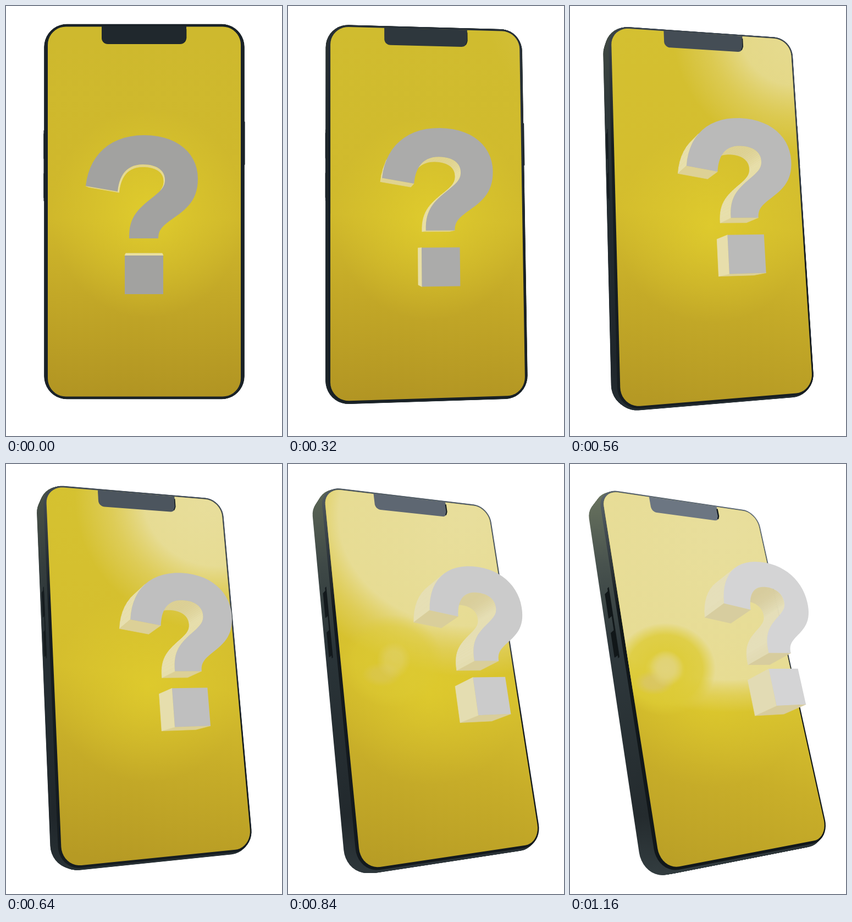
Animation, 502 px wide and 779 px high, one loop 1200 ms. Source, as an HTML page with a canvas:

```html
<!DOCTYPE html>
<html lang="en">
<head>
<meta charset="utf-8">
<title>Turning phone</title>
<style>
  html, body { margin: 0; width: 100%; height: 100%; overflow: hidden; background: #fff; }
  canvas { display: block; }
</style>
</head>
<body>
<canvas id="stage" width="502" height="779"></canvas>
<script>
const ctx = document.getElementById('stage').getContext('2d');
const LOOP = 1200, STEP = 40, END = 1160;
const CX = 251.5, CY = 372.5;             // centre of the phone
const FOCAL = 1250, PIVOT = 25;           // pivot lies inside the body
const DEPTH = 48;                         // body thickness
const MARK_NEAR = 183, MARK_FAR = 125;    // heights of the mark above the glass
const YAW = .58, PITCH = .317, ROLL = .009;

const ease = k => k * k * (3 - 2 * k);
const clamp = k => Math.min(1, Math.max(0, k));
const mix = (a, b, k) => a.map((v, i) => v + (b[i] - v) * k);
const rgb = (c, a = 1) => `rgba(${c.map(Math.round).join()},${a})`;

// x, y on the unturned glass, z above it, to stage coordinates
function camera(p) {
  const ca = Math.cos(YAW * p), sa = Math.sin(YAW * p);
  const cb = Math.cos(PITCH * p), sb = Math.sin(PITCH * p);
  const cr = Math.cos(ROLL * p), sr = Math.sin(ROLL * p);
  return ([x, y], z = 0) => {
    const X = x - CX, Y = y - CY, Z = -PIVOT - z;
    const py = Y * cb + Z * sb, pz = Z * cb - Y * sb;
    const px = X * ca - pz * sa;
    const s = FOCAL / (FOCAL + PIVOT + X * sa + pz * ca);
    return [CX + s * (px * cr + py * sr), CY + s * (py * cr - px * sr)];
  };
}

function trace(points) {
  ctx.beginPath();
  points.forEach(q => ctx.lineTo(...q));
  ctx.closePath();
}

function fill(points, style, line = 0) {
  trace(points);
  ctx.fillStyle = ctx.strokeStyle = style;
  ctx.fill();
  if (line) {
    ctx.lineWidth = line;
    ctx.lineJoin = 'round';
    ctx.stroke();
  }
}

function linear(x0, y0, x1, y1, stops) {
  const g = ctx.createLinearGradient(x0, y0, x1, y1);
  stops.forEach(([k, c]) => g.addColorStop(k, rgb(c)));
  return g;
}

function glow(x, y, rx, ry, stops) {
  const g = ctx.createRadialGradient(0, 0, 0, 0, 0, 1);
  stops.forEach(([k, c, a]) => g.addColorStop(k, rgb(c, a)));
  ctx.save();
  ctx.translate(x, y);
  ctx.scale(rx, ry);
  ctx.fillStyle = g;
  ctx.fillRect(-1, -1, 2, 2);
  ctx.restore();
}

function roundBox(l, t, r, b, rTop, rBottom) {
  const pts = [];
  [[l, t, 1, 1, rTop], [r, t, -1, 1, rTop], [r, b, -1, -1, rBottom], [l, b, 1, -1, rBottom]]
    .forEach(([x, y, dx, dy, rad], n) => {
      for (let i = 0; i <= 10; i++) {
        const a = Math.PI * (1 + n / 2 + i / 20);
        pts.push([x + rad * (dx + Math.cos(a)), y + rad * (dy + Math.sin(a))]);
      }
    });
  return pts;
}

const panel = m => roundBox(76 - m, 37.5 - m, 427 + m, 707.5 + m, 33 + m, 33 + m);

function curve(start, parts) {
  const pts = [start];
  for (const s of parts) {
    const a = pts[pts.length - 1];
    if (s.length === 2) { pts.push(s); continue; }
    for (let i = 1; i <= 14; i++) {
      const k = i / 14, m = 1 - k;
      pts.push([0, 1].map(c =>
        m * m * m * a[c] + 3 * m * m * k * s[c] + 3 * m * k * k * s[c + 2] + k * k * k * s[c + 4]));
    }
  }
  return pts;
}

const hook = curve([145, 326], [
  [151, 270, 190, 234, 251, 234],
  [313, 234, 349, 268, 349, 313],
  [349, 350, 330, 367, 305, 384],
  [285, 398, 277, 405, 277, 421],
  [224, 421],
  [223, 385, 238, 370, 260, 352],
  [282, 335, 289, 328, 289, 315],
  [289, 297, 273, 287, 249, 287],
  [220, 287, 206, 306, 203, 336]
]);
const dot = [[216, 452], [286, 452], [286, 522], [216, 522]];

// mark outlines are given as seen at rest, so undo their enlargement
const shrink = (FOCAL - MARK_NEAR) / FOCAL;
const mark = [hook, dot].map(s => s.map(([x, y]) => [CX + (x - CX) * shrink, CY + (y - CY) * shrink]));

function drawBody(at, p) {
  const dark = [26, 34, 40];
  const toned = stops => stops.map(([k, c]) => [k, mix(dark, c, p)]);
  const side = linear(0, 60, 0, 740, toned([
    [0, [104, 114, 94]], [.18, [72, 82, 78]], [.4, [46, 56, 60]], [.85, [36, 43, 46]], [1, [50, 60, 63]]
  ]));
  const rim = linear(300, 40, 150, 300, toned([[0, [98, 110, 124]], [.45, [90, 100, 108]], [1, [17, 23, 26]]]));
  const strip = (x, top, bottom, near, far, line) =>
    fill([at([x, top], near), at([x, top], far), at([x, bottom], far), at([x, bottom], near)],
      rgb(mix(dark, [17, 23, 25], p)), line);

  strip(436, 208, 286, -15, -30, 1.6);
  for (let i = 24; i >= 0; i--) {
    const z = i / 24, m = 3 + 6 * Math.min(1, z / .33);
    fill(panel(m).map(q => at(q, -DEPTH * z)), z < .1 ? rim : side);
  }
  strip(67, 224, 353, -12, -17, .5);
  strip(67, 230, 275, -15, -29, 1.6);
  strip(67, 303, 347, -15, -29, 1.6);
}

function drawScreen(at, p) {
  ctx.save();
  trace(panel(0).map(q => at(q)));
  ctx.clip();
  ctx.fillStyle = linear(250 + 80 * p, 50, 250 - 110 * p, 720, [
    [0, mix([206, 185, 46], [218, 200, 52], p)],
    [.5, mix([208, 184, 43], [216, 195, 47], p)],
    [.72, mix([194, 167, 39], [201, 175, 41], p)],
    [1, mix([176, 147, 34], [186, 159, 38], p)]
  ]);
  ctx.fillRect(0, 0, 502, 779);

  const warm = [226, 207, 45];
  glow(258, 375 + 50 * p, 175, 190 - 30 * p, [[0, warm, .85 - .25 * p], [.45, warm, .45 - .15 * p], [1, warm, 0]]);

  // a large lamp slides in from the upper right
  const s = (p - .37) / .63, a = clamp((p - .12) / .4);
  const edge = .1 + .72 * p, pale = [232, 222, 156], soft = [229, 214, 122];
  glow(430 - 140 * s, 30 + 90 * s, 180 + 240 * s, 200 + 130 * s, [
    [0, pale, a], [edge, pale, a * .92], [(edge + 1) / 2, soft, a * .5], [1, soft, 0]
  ]);

  // mirrored hook
  const k = clamp((p - .62) / .38), ring = [221, 203, 52], sand = [217, 197, 108], spot = [225, 211, 122];
  if (k) {
    const x = 208 - 35 * k, y = 342 + 30 * k;
    glow(x, y, 92, 84, [[0, ring, .3 * k], [.4, ring, .9 * k], [.74, ring, .8 * k], [1, ring, 0]]);
    glow(x - 20, y + 24, 36, 22, [[0, sand, .8 * k], [.5, sand, .7 * k], [1, sand, 0]]);
    glow(x + 2, y - 2, 31, 33, [[0, spot, k], [.5, spot, .85 * k], [1, spot, 0]]);
  }
  ctx.restore();

  fill(roundBox(174, 37, 328, 69, 0, 11).map(q => at(q)), rgb(mix([32, 40, 45], [108, 118, 130], p)));
  ctx.beginPath();
  [[328, 42], [328, 58], [325, 65]].forEach(q => ctx.lineTo(...at(q)));
  ctx.strokeStyle = rgb([20, 27, 31]);
  ctx.lineWidth = .6 + 1.8 * p;
  ctx.stroke();
}

function drawMark(at, p) {
  const lit = mix([233, 223, 160], [229, 223, 186], p);
  const shade = mix([226, 213, 140], [215, 204, 158], p);
  const face = rgb(mix([162, 162, 160], [212, 212, 213], p));

  for (const shape of mark) {
    const near = shape.map(q => at(q, MARK_NEAR)), far = shape.map(q => at(q, MARK_FAR));
    near.forEach((a, i) => {
      const j = (i + 1) % near.length, b = near[j];
      const nx = b[1] - a[1], ny = a[0] - b[0];
      const ox = far[i][0] + far[j][0] - a[0] - b[0], oy = far[i][1] + far[j][1] - a[1] - b[1];
      if (nx * ox + ny * oy <= 0) return;
      const down = Math.max(0, ny / Math.hypot(nx, ny));
      fill([a, b, far[j], far[i]], rgb(mix(lit, shade, down)), .7);
    });
    fill(near, face);
  }
}

function draw(p) {
  ctx.fillStyle = '#fff';
  ctx.fillRect(0, 0, 502, 779);
  const at = camera(p);
  drawBody(at, p);
  drawScreen(at, p);
  drawMark(at, p);
}

function tick() {
  const t = Math.floor(performance.now() % LOOP / STEP) * STEP;
  draw(ease(t / END));
  requestAnimationFrame(tick);
}
tick();
</script>
</body>
</html>
```
